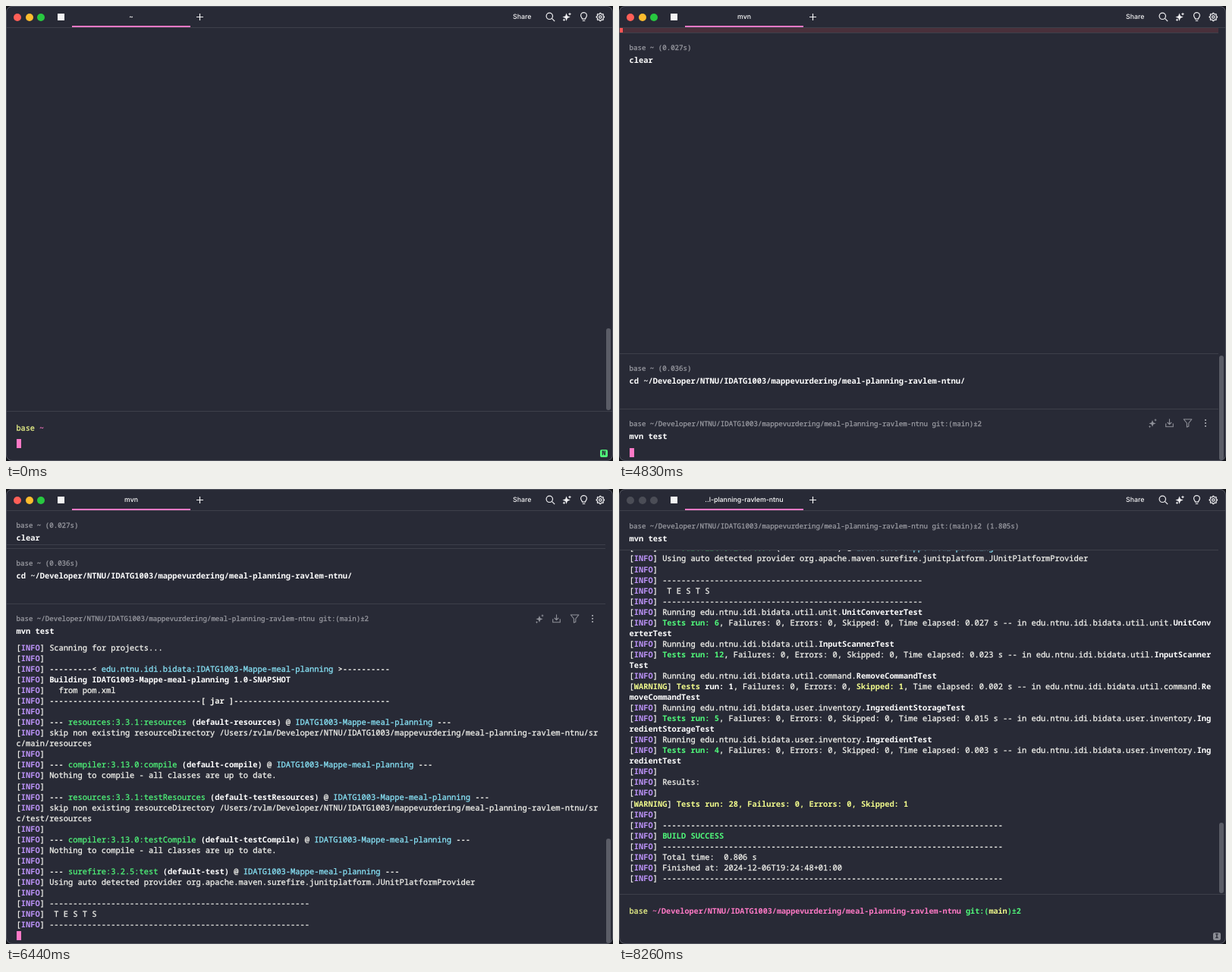
Write an HTML page that moves like this. It is 800 px wide and 600 px high and loops after 8.33 s.

```html
<!DOCTYPE html>
<html lang="en">
<head>
<meta charset="utf-8">
<title>Terminal</title>
<style>
  html, body { margin: 0; width: 100%; height: 100%; overflow: hidden; background: #15161b; }
  #stage {
    position: relative; width: 800px; height: 600px; overflow: hidden;
    background: #282a36; color: #f8f8f2;
    font: 500 10.4px "Noto Sans Mono", "DejaVu Sans Mono", monospace;
    text-rendering: geometricPrecision; font-variant-ligatures: none;
    -webkit-text-stroke: .25px;
  }
  #stage div, #stage svg { position: absolute; }
  .ui { font: 500 8.8px Inter, Roboto, sans-serif; line-height: 14px; -webkit-text-stroke: 0; }
  .ln { left: 13.5px; line-height: 14px; margin-top: -8px; white-space: pre; }
  .small { font-size: 9.12px; color: #9c9da4; }
  .cmd { font-weight: 700; color: #fff; -webkit-text-stroke: 0; }
  .prompt { font-size: 10.15px; }
  .block { left: 0; width: 790px; border-top: 1px solid #3d3f4a; }
  .head { left: 0; width: 790px; box-sizing: border-box; border-bottom: 1px solid transparent; }
  .stuck { background: #282a36; border-color: #3d3f4a; }
  #view { inset: 0; }
  #out {
    left: 13.5px; top: 50.5px; width: 770px; overflow: hidden;
    line-height: 14.04px; white-space: pre-wrap; line-break: anywhere;
  }
  #failed { left: 0; width: 790px; height: 60px; background: #49303b; }
  #failed div { left: 0; width: 5px; height: 100%; background: #ff5555; }
  #input { left: 0; top: 534px; width: 800px; height: 66px; border-top: 1px solid #3d3f4a; box-sizing: border-box; }
  #cursor { background: #ff79c6; height: 12px; }
  #badge {
    left: 783px; top: 585px; width: 10px; height: 10px; border-radius: 2px;
    font: 700 8px/10px "Noto Sans Mono", monospace; text-align: center; color: #282a36;
  }
  #bar { left: 791px; width: 6px; border-radius: 3px; background: #5b5d67; }
  #rim { inset: 0; border: 1px solid #555761; border-radius: 8px; box-shadow: 0 0 0 20px #15161b; }
  .light { top: 10px; width: 10px; height: 10px; border-radius: 50%; }
  .b, .w, .v, .G, .Y, .p { font-weight: 700; -webkit-text-stroke: 0; }
  .w { color: #fff; }
  .v { color: #bd93f9; }
  .g, .G { color: #50fa7b; }
  .c { color: #8be9fd; }
  .y, .Y { color: #f1fa8c; }
  .p { color: #ff79c6; }
  .link { color: #69b1f5; text-decoration: underline 1px; text-underline-offset: 2px; }
</style>
</head>
<body>
<div id="stage">
  <div id="view">
    <div id="failed"><div></div></div>
    <div id="clear" class="block"></div>
    <div id="cd" class="block"></div>
    <div id="mvn" class="block"><div id="out"></div></div>
    <svg id="tools" width="90" height="16" style="left:695px" fill="none" stroke="#8f9199" stroke-width="1.1">
      <path fill="#8f9199" stroke="none" d="M8 4l1.200 3.300 3.300 1.200-3.300 1.200L8 13 6.800 9.700 3.500 8.500l3.300-1.200zM12 2l.6 1.400 1.400.6-1.400.6-.6 1.400-.6-1.400-1.400-.6 1.400-.6zM4.500 11l.5 1.200 1.200.5-1.200.5-.5 1.200-.5-1.200-1.200-.5 1.200-.5z"/>
      <path d="M30.500 2.500v7M27.800 7l2.700 2.700L33.200 7M25.700 8.500v4.300h9.600V8.500"/>
      <path d="M49.300 3h10.600l-4.100 5v4.200l-2.400 1V8z" stroke-linejoin="round"/>
      <path d="M78 3v2M78 7v2M78 11v2" stroke-width="2"/>
    </svg>
  </div>

  <div id="input">
    <div id="prompt" class="ln prompt" style="top:21.500px"></div>
    <div id="typed" class="ln cmd" style="top:41.500px"></div>
  </div>
  <div id="cursor"></div>
  <div id="badge"></div>
  <div id="bar"></div>

  <div style="left:0;top:28px;width:800px;height:1px;background:#3d3f4a"></div>
  <div class="light" style="left:10px"></div>
  <div class="light" style="left:25.600px"></div>
  <div class="light" style="left:41.200px"></div>
  <div style="left:68px;top:10px;width:9px;height:9px;background:#f4f4f4"></div>
  <div id="tab" class="ui" style="left:87px;width:156px;top:7.500px;text-align:center;color:#fff"></div>
  <div style="left:87px;top:26px;width:156px;height:2px;background:#ff79c6"></div>
  <div class="ui" style="left:668px;top:7.500px;color:#f1f1f3">Share</div>
  <svg width="800" height="28" style="left:0;top:0" fill="none" stroke="#f1f1f3" stroke-width="1.200">
    <path d="M255.500 10v9M251 14.500h9"/>
    <circle cx="716.300" cy="13.300" r="4.200"/><path d="M719.400 16.400l3.800 3.800"/>
    <path fill="#f1f1f3" stroke="none" d="M738.500 9.500l1.500 3.700 3.700 1.300-3.700 1.500-1.500 3.700-1.300-3.700-3.700-1.500 3.700-1.300zM743 8.500l.7 1.500 1.500.6-1.500.7-.7 1.500-.7-1.500-1.500-.7 1.500-.6zM735.500 16.300l.6 1.400 1.400.6-1.400.6-.6 1.400-.6-1.400-1.400-.6 1.400-.6z"/>
    <path d="M759.600 17.200c0-1.700-2-2.300-2-4.700a3.900 3.900 0 0 1 7.800 0c0 2.400-2 3-2 4.700zM759.800 19.500h3.400"/>
    <path id="gear" stroke-linejoin="round"/><circle cx="783.300" cy="14.500" r="1.700"/>
  </svg>
  <div id="rim"></div>
</div>

<script>
const LOOP = 8330, ROW = 14.04, COL = 6.24;
const ENTER_CD = 1330, RUN = 4830, DONE = 6650, LEAVE = 7700, BLUR = 8050;
const $ = id => document.getElementById(id);
const tag = c => s => `<span class="${c}">${s}</span>`;
const [bold, white, violet, green, Green, cyan, yellow, Yellow, pink] =
  ['b', 'w', 'v', 'g', 'G', 'c', 'y', 'Y', 'p'].map(tag);

const repo = 'meal-planning-ravlem-ntnu';
const path = `~/Developer/NTNU/IDATG1003/mappevurdering/${repo}`;
const project = 'IDATG1003-Mappe-meal-planning';
const pkg = 'edu.ntnu.idi.bidata';

// Build log
const info = (s = '') => `[${violet('INFO')}] ${s}`;
const warn = s => `[${Yellow('WARNING')}] ${s}`;
const dash = n => bold('-'.repeat(n));
const goal = (plugin, id) =>
  info(`${dash(3)} ${green(plugin)} ${white(`(${id})`)} @ ${cyan(project)} ${dash(3)}`);
const skip = dir => info('skip non existing resourceDirectory ' +
  `/Users/rvlm${path.slice(1)}/src/${dir}/resources`);
const idle = info('Nothing to compile - all classes are up to date.');
const test = (sub, name, n, secs, skipped = 0) => {
  const cls = `${pkg}.${sub}.${white(name)}`;
  const tail = `, Time elapsed: ${secs} s -- in ${cls}`;
  const mid = ', Failures: 0, Errors: 0, ';
  return [info('Running ' + cls), skipped
    ? warn(Yellow('Tests ') + white('run: ' + n) + mid + Yellow('Skipped: ' + skipped) + tail)
    : info(Green('Tests run: ' + n) + mid + 'Skipped: 0' + tail)];
};
$('out').innerHTML = [
  info('Scanning for projects...'),
  info(),
  info(dash(9) + bold('&lt; ') + cyan(`${pkg}:${project}`) + bold(' &gt;') + dash(10)),
  info(white(`Building ${project} 1.0-SNAPSHOT`)),
  info('  from pom.xml'),
  info(dash(32) + bold('[ jar ]') + dash(33)),
  info(),
  goal('resources:3.3.1:resources', 'default-resources'),
  skip('main'),
  info(),
  goal('compiler:3.13.0:compile', 'default-compile'),
  idle,
  info(),
  goal('resources:3.3.1:testResources', 'default-testResources'),
  skip('test'),
  info(),
  goal('compiler:3.13.0:testCompile', 'default-testCompile'),
  idle,
  info(),
  goal('surefire:3.2.5:test', 'default-test'),
  info('Using auto detected provider org.apache.maven.surefire.junitplatform.JUnitPlatformProvider'),
  info(),
  info('-'.repeat(55)),
  info(' T E S T S'),
  info('-'.repeat(55)),
  ...test('util.unit', 'UnitConverterTest', 6, '0.027'),
  ...test('util', 'InputScannerTest', 12, '0.023'),
  ...test('util.command', 'RemoveCommandTest', 1, '0.002', 1),
  ...test('user.inventory', 'IngredientStorageTest', 5, '0.015'),
  ...test('user.inventory', 'IngredientTest', 4, '0.003'),
  info(),
  info('Results:'),
  info(),
  warn(Yellow('Tests run: 28, Failures: 0, Errors: 0, Skipped: 1')),
  info(),
  info(dash(72)),
  info(Green('BUILD SUCCESS')),
  info(dash(72)),
  info('Total time:  0.806 s'),
  info('Finished at: 2024-12-06T19:24:48+01:00'),
  info(dash(72)),
].join('\n');

// Block headers
function addHead(id, label, cmd, height) {
  const head = document.createElement('div');
  head.className = 'head';
  head.style.height = height + 'px';
  head.innerHTML = `<div class="ln small" style="top:20px">${label}</div>` +
    `<div class="ln cmd" style="top:37px">${cmd}</div>`;
  $(id).append(head);
  return head;
}
const heads = {
  clear: addHead('clear', 'base ~ (0.027s)', 'clear', 45),
  cd: addHead('cd', 'base ~ (0.036s)', `cd <span id="target">${path}/</span>`, 51),
  mvn: addHead('mvn', `base ${path} git:(main)±2<span id="took"> (1.805s)</span>`, 'mvn test', 51),
};
const homePrompt = yellow('base') + ' ' + pink('~');
const repoPrompt = `${yellow('base')} ${pink(path)} ${Green('git:(')}${Yellow('main')}${Green(')±2')}`;

// Gear outline
$('gear').setAttribute('d', 'M' + Array.from({ length: 32 }, (_, i) => {
  const a = (i - .5) * Math.PI / 16, r = i % 4 < 2 ? 5.2 : 4;
  return `${(783.3 + r * Math.cos(a)).toFixed(2)} ${(14.5 + r * Math.sin(a)).toFixed(2)}`;
}).join('L') + 'z');

// Timetables: [ms, value]
const rowSteps = [[0, 0], [5740, 1], [5810, 7], [5880, 8], [5950, 10], [6020, 13],
  [6090, 17], [6160, 21], [6230, 23], [6300, 27], [6510, 36], [6580, 53]];
const keys = [3640, 3780, 3850, 3990, 4060, 4200, 4270, 4340];
const blinkOff = [[840, 1050], [1960, 2450], [2940, 3500], [7210, 7700], [BLUR, LOOP]];
const at = (steps, t) => steps.filter(s => s[0] <= t).pop()[1];

const show = (el, on) => { el.style.visibility = on ? 'visible' : 'hidden'; };
const setHTML = (el, s) => { if (el.shown !== s) el.innerHTML = el.shown = s; };

function place(id, top, height) {
  const el = $(id), stuck = top < 28 && top + height > 40;
  el.style.top = top + 'px';
  el.style.height = height + 'px';
  heads[id].style.top = (stuck ? 28.5 - top : 0) + 'px';
  heads[id].classList.toggle('stuck', stuck);
  return (stuck ? 28.5 : top) + 19.5;
}

function render(t) {
  const running = t >= RUN && t < DONE, done = t >= DONE;
  const hasCd = t >= ENTER_CD, hasMvn = t >= RUN;
  const bottom = running ? 600 : 534;
  const rows = at(rowSteps, t);

  // Blocks stack upwards from the bottom edge
  const mvnH = !hasMvn ? 0 : done ? 79 + 52 * ROW : 69.5 + rows * ROW;
  const mvnTop = bottom - mvnH;
  const cdTop = mvnTop - (hasCd ? 73 : 0);
  const clearTop = Math.min(bottom - 506, cdTop) - 59;
  $('view').style.clipPath = `inset(28px 0 ${600 - bottom}px 0)`;
  $('failed').style.top = clearTop - 60 + 'px';
  place('clear', clearTop, 59);
  const cdY = place('cd', cdTop, 73);
  const mvnY = place('mvn', mvnTop, mvnH);
  $('out').style.height = rows * ROW + 'px';
  $('cd').style.display = hasCd ? '' : 'none';
  $('mvn').style.display = hasMvn ? '' : 'none';
  $('took').style.display = done ? '' : 'none';
  $('target').className = hasMvn ? '' : 'link';
  show($('tools'), hasCd && t < LEAVE);
  $('tools').style.top = (hasMvn ? mvnY : cdY) - 8 + 'px';

  // Input
  let text = '';
  if (t >= 1050 && t < ENTER_CD) text = `cd ${path}/`;
  if (t >= keys[0] && t < RUN) text = 'mvn test'.slice(0, keys.filter(k => k <= t).length);
  $('input').style.display = running ? 'none' : '';
  setHTML($('prompt'), t < 1470 ? homePrompt : repoPrompt);
  setHTML($('typed'), text);

  const normal = t < 350, cur = $('cursor').style;
  cur.left = 13.5 + text.length * COL + 'px';
  cur.top = (running ? 583 : 570.5) + 'px';
  cur.width = (normal || running ? 6.5 : 2) + 'px';
  show($('cursor'), !blinkOff.some(([a, b]) => t >= a && t < b));

  show($('badge'), !running);
  $('badge').style.background = normal ? '#50fa7b' : '#8b8d95';
  setHTML($('badge'), normal ? 'N' : 'I');

  // Window chrome
  const barTop = running ? 461 : done ? 440 : 425;
  $('bar').style.top = barTop + 'px';
  $('bar').style.height = bottom - 1 - barTop + 'px';
  setHTML($('tab'), running ? 'mvn' : t < 1400 ? '~' : '..' + repo.slice(3));
  const lights = t < BLUR ? ['#ff5f57', '#febc2e', '#28c840'] : Array(3).fill('#4b4d56');
  document.querySelectorAll('.light').forEach((el, i) => { el.style.background = lights[i]; });
}

const start = performance.now();
function tick() {
  render((performance.now() - start) % LOOP);
  requestAnimationFrame(tick);
}
tick();
</script>
</body>
</html>
```
